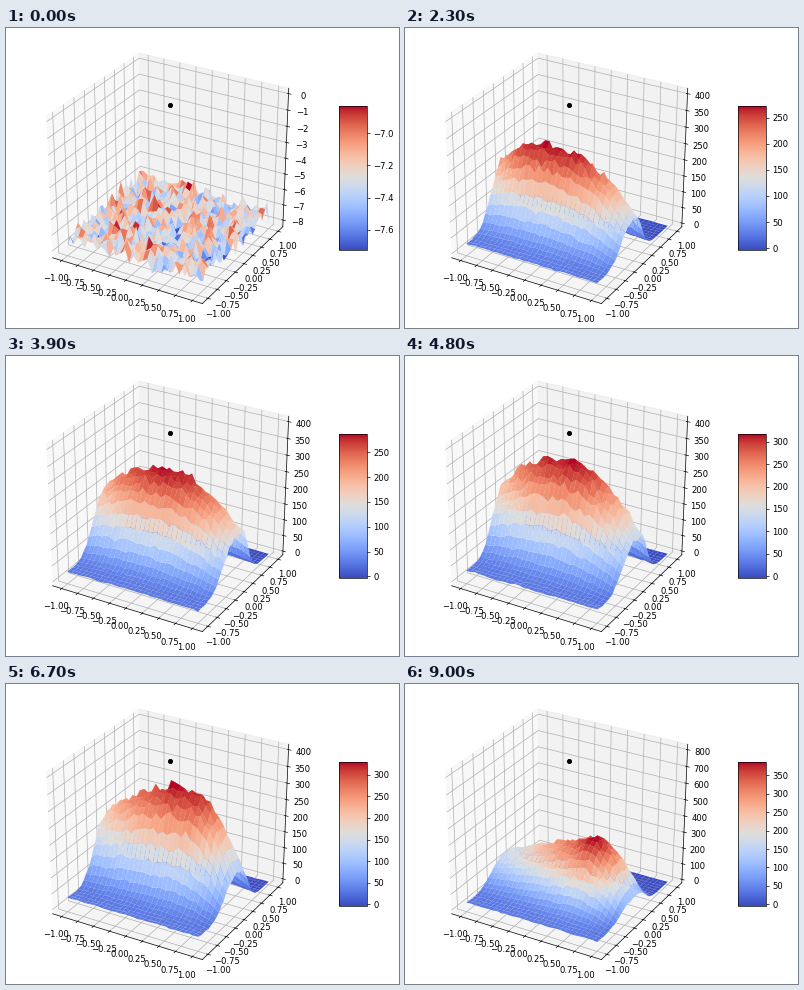
These frames come from a looping animation (393 px wide and 300 px high, 9100 ms). A matplotlib script:

```python
import numpy as np
import matplotlib.pyplot as plt
from matplotlib.animation import FuncAnimation
from matplotlib.cm import ScalarMappable
from matplotlib.ticker import MaxNLocator

W, H, DPI = 393, 300, 62.5
FRAMES, STEP_MS = 91, 100
PAD = 1 / 48          # margin between the data cube and the panes
HEADROOM = 0.018      # space above the top z tick
LIM = 1.1             # x and y limits, 5 % beyond the data

plt.rcParams.update({"font.family": "DejaVu Sans", "font.size": 9.8})
X, Y = np.meshgrid(np.linspace(-1, 1, 30), np.linspace(-1, 1, 30))


def place(x, y, w, h):
    """Figure rectangle from pixels counted from the top left."""
    return [x / W, 1 - (y + h) / H, w / W, h / H]


def sigmoid(v):
    return 1 / (1 + np.exp(-v))


def dome():
    corner = np.clip((X + Y) / 2, 0, None) ** 2
    return 27.5 * np.exp(-0.55 * (X**2 + Y**2)) - 8 * corner


def ridge(height, peak, left, right, power, front, back):
    """Wall along x with its summit at peak, sloping to both ends."""
    s_left = np.clip((peak - X) / (1 + peak), 0, 1)
    s_right = np.clip((X - peak) / (1 - peak), 0, 1)
    crest = 1 - (1 - left) * s_left**power - (1 - right) * s_right**1.8
    profile = sigmoid((Y - front) / 0.135) * sigmoid((back - Y) / 0.075)
    shape = crest * profile / profile.max()
    foot = 0.1 * np.clip(-Y, 0, 1) * (1 - shape)
    return height * (shape + foot - 0.01 * (1 - shape))


# time in frames, surface
KEYS = [
    (0, np.full_like(X, -7.29)),
    (10, dome()),
    (23, ridge(270, 0.0, 0.74, 0.45, 3.5, -0.38, 0.23)),
    (39, ridge(282, 0.0, 0.73, 0.54, 2.2, -0.36, 0.38)),
    (57, ridge(346, 0.0, 0.65, 0.36, 2.0, -0.34, 0.38)),
    (76, ridge(336, 0.35, 0.58, 0.35, 0.8, -0.32, 0.36)),
    (90, ridge(390, 0.35, 0.42, 0.26, 0.9, -0.40, 0.34)),
]


def mean_surface(i):
    for (t0, a), (t1, b) in zip(KEYS, KEYS[1:]):
        if i <= t1:
            return a + (b - a) * (i - t0) / (t1 - t0)


def noisy(z, i):
    rng = np.random.default_rng(100 + i)
    sd = 0.34 + 0.028 * np.clip(z, 0, None)
    return z + sd * np.clip(rng.normal(size=z.shape), -3.4, 3.4)


def ceiling(z):
    """Zero for negative values, else the next doubling of 12.5."""
    peak = 1.06 * z.max()
    if peak <= 0:
        return 0.0
    top = 12.5
    while top < peak:
        top *= 2
    return top


fig = plt.figure(figsize=(W / DPI, H / DPI), dpi=DPI, facecolor="white")
ax = fig.add_axes(place(5.9, 6.2, 307, 287), projection="3d")
ax.apply_aspect = lambda position=None: None   # stretch to the full rectangle
ax.view_init(30, -60)
ax.set_box_aspect((1, 1, 1), zoom=0.94676)
edge = LIM * (1 + 2 * PAD)
ticks = np.linspace(-1, 1, 9)
ax.set(xlim=(-edge, edge), ylim=(-edge, edge), xticks=ticks, yticks=ticks)

dot, = ax.plot([0], [0], [0], "o", color="black", ms=4.8, zorder=10)

bar = ScalarMappable(cmap="coolwarm")
bar.set_clim(-7.8, -6.7)
fig.colorbar(bar, cax=fig.add_axes(place(332.5, 77.8, 28.7, 144)))

z_locator = MaxNLocator(9, steps=[1, 2, 2.5, 5, 10])


def draw(i):
    for old in list(ax.collections):
        old.remove()
    base = mean_surface(i)
    z = noisy(base, i)
    surf = ax.plot_surface(X, Y, z, cmap="coolwarm", linewidth=0.8)
    faces = surf.get_array()
    surf.set_clim(faces.min(), faces.max())
    bar.set_clim(faces.min(), faces.max())

    lo, top = z.min(), ceiling(base)
    marks = z_locator.tick_values(lo, top)
    ax.set_zticks(marks[(marks >= lo) & (marks <= top)])
    hi = top + HEADROOM * (top - lo)
    pad = (hi - lo) * PAD
    ax.set_zlim(lo - pad, hi + pad)
    dot.set_data_3d([0], [0], [hi])
    return surf, dot


anim = FuncAnimation(fig, draw, frames=FRAMES, init_func=lambda: draw(0),
                     interval=STEP_MS, repeat=True, repeat_delay=0, blit=False)
plt.show()
```
